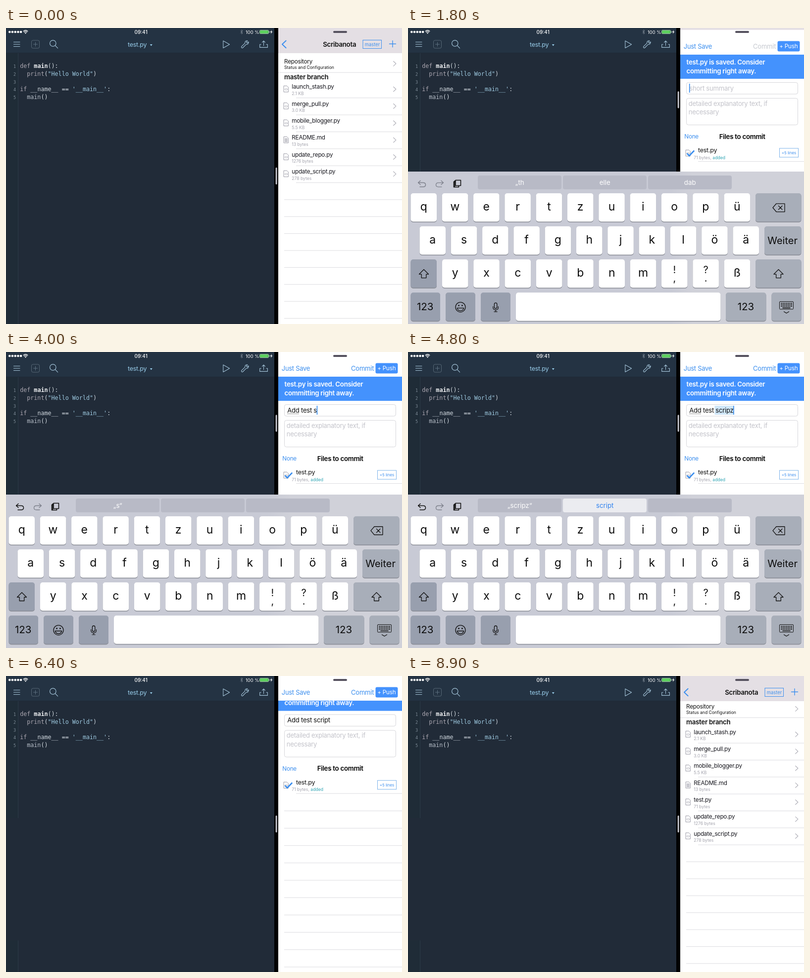
An HTML page that plays this animation: 800 px wide and 600 px high, repeating every 9000 ms.

```html
<!DOCTYPE html>
<html lang="en">
<head>
<meta charset="utf-8">
<title>Commit from the editor</title>
<style>
html, body { margin: 0; width: 100%; height: 100%; overflow: hidden; background: #212b38; }
svg { display: block; width: 800px; height: 600px; }
text { font-family: Inter, Roboto, sans-serif; white-space: pre; }
.t { letter-spacing: -.02em; }
.b { font-weight: 600; }
.m { text-anchor: middle; }
.code { font: 11.7px "DejaVu Sans Mono", monospace; }
.num { font: 8.5px "DejaVu Sans Mono", monospace; text-anchor: end; }
.i { fill: none; stroke-linecap: round; stroke-linejoin: round; }
</style>
</head>
<body>
<svg id="stage" viewBox="0 0 800 600"></svg>
<script>
const LOOP = 9000, KB = 289, BLUE = '#3d8fee', SOLID = '#4492fd';
const $ = id => document.getElementById(id);

const text = (x, y, s, size, fill, cls = 't', more = '') =>
  `<text x="${x}" y="${y}" font-size="${size}" fill="${fill}" class="${cls}" ${more}>${s}</text>`;
const rect = (x, y, w, h, fill, r = 0, more = '') =>
  `<rect x="${x}" y="${y}" width="${w}" height="${h}" rx="${r}" fill="${fill}" ${more}/>`;
const frame = (x, y, w, h, stroke, r = 0) =>
  rect(x, y, w, h, 'none', r, `stroke="${stroke}"`);
const path = (d, stroke, w = 1, more = '') =>
  `<path class="i" d="${d}" stroke="${stroke}" stroke-width="${w}" ${more}/>`;
const dot = (x, y, r, fill) => `<circle cx="${x}" cy="${y}" r="${r}" fill="${fill}"/>`;
const rule = (x, y) => `<path d="M${x} ${y}H800" stroke="#dcdce0"/>`;
const group = (id, body, more = '') => `<g id="${id}" ${more}>${body}</g>`;
const range = (n, f) => Array.from({ length: n }, (_, i) => f(i)).join('');
const span = (s, fill, more = '') => `<tspan fill="${fill}" ${more}>${s}</tspan>`;

// ---- editor ----
function editor() {
  const ink = '#a3c3d8', key = '#aaa6b0', str = '#9fcbe2', fg = '#d3dae1';
  const lines = [
    span('def ', key) + span('main', '#f0f2f4', 'font-weight="bold"') + span('():', fg),
    span('  print', key) + span('(', fg) + span('"Hello World"', str) + span(')', fg),
    '',
    span('if ', key) + span('__name__ == ', fg) + span("'__main__'", str) + span(':', fg),
    span('  main', '#b9c0ca') + span('()', fg)
  ];
  return rect(0, 0, 542, 600, '#212b38') + rect(0, 50, 24, 550, '#1f2c37') +
    path('M24.5 51V600', '#2b3a47') +
    group('patch', rect(0, 288, 26, 248, '#212b38')) +
    rect(0, 0, 542, 50, '#243343') + rect(0, 50, 542, 1, '#1f2a36') +
    range(5, i => dot(7.3 + i * 5.7, 8, 2.3, '#fff')) +
    path('M35.2 6.6Q39.5 2.8 43.8 6.6M36.8 8.5Q39.5 6.2 42.2 8.5', '#fff', 1.3) + dot(39.5, 10.4, 1.2, '#fff') +
    text(272.7, 11.6, '09:41', 10, '#fff', 'm', 'font-weight="500"') +
    path('M473.8 5.8L478.2 10.2L476 12.2V3.8L478.2 5.8L473.8 10.2', '#8894a0', .8) +
    text(484, 11.5, '100 %', 9.4, '#fff', '') +
    frame(512.5, 4.5, 18, 7, '#a9d8ae', 1.2) + rect(513.3, 5.2, 16.4, 5.6, '#5fd65f', .6) +
    rect(531.5, 6.5, 1.2, 3, '#a9d8ae') + '<path d="M537 4L533.6 8.6H535.8L535 12L538.4 7.3H536.2Z" fill="#fff"/>' +
    path('M15.5 28.5H28M15.5 33H28M15.5 37.5H28', ink, 1.1) +
    frame(51.5, 25, 16, 16, '#566775', 3) + path('M59.5 29V37M55.5 33H63.5', '#5f7281') +
    path('M101 31A6.2 6.2 0 1 1 88.6 31A6.2 6.2 0 1 1 101 31M99.2 35.4L104.6 40.8', ink, 1.2) +
    text(246, 37.8, 'test.py', 12.5, '#98cdea') + '<path d="M290.8 33H295.8L293.3 36.6Z" fill="#98cdea"/>' +
    path('M438.8 26L451.6 33.2L438.8 40.4Z', ink, 1.1) +
    path('M476 37.4L482.8 30.7C482.2 27.5 485 25 488 26L485.4 28.6L487.4 30.6L490 28C490.9 31 488.4 33.8 485.2 33.2L478.5 40C476.8 41.5 474.4 39 476 37.4Z', ink, 1.1) +
    path('M515.2 33.2H512.7V39.4H528.4V33.2H525.9M520.5 35.8V26.2M517.6 29.2L520.5 26.2L523.4 29.2', ink, 1.1) +
    lines.map((l, i) => {
      const y = 81.2 + i * 15.7;
      return text(20, y, i + 1, 8.5, '#7c8a95', 'num') + `<text x="28.2" y="${y}" class="code">${l}</text>`;
    }).join('');
}

// ---- repository list ----
const fileIcon = (y, doc) =>
  path(`M561.5 ${y}H567.5L570.3 ${y + 2.8}V${y + 12.5}H561.5Z`, '#8f8f9c', .9) +
  path(doc ? `M563.3 ${y + 4}H568.3M563.3 ${y + 6}H568.3M563.3 ${y + 8}H568.3M563.3 ${y + 10}H568.3`
    : `M565 ${y + 5.3}L563.4 ${y + 7}L565 ${y + 8.7}M566.8 ${y + 5.3}L568.4 ${y + 7}L566.8 ${y + 8.7}`, '#858593', .9);
const chevron = y => path(`M782.8 ${y - 4.8}L787.8 ${y}L782.8 ${y + 4.8}`, '#b4b4bc', 1.3);

function list(files) {
  const step = 34.37;
  return text(562, 71.8, 'Repository', 11.72, '#111') +
    text(562, 82.6, 'Status and Configuration', 8.6, '#111', '') + chevron(72.3) + rule(550, 90.2) +
    text(562, 103.7, 'master branch', 13.28, '#111', 't b') +
    files.map(([name, size], i) => {
      const y = i * step;
      return fileIcon(117.3 + y, name.endsWith('md')) + text(577.3, 123.3 + y, name, 11.72, '#15151c') +
        text(577.3, 135.9 + y, size, 8.6, '#a3a3ad', '') + chevron(124 + y);
    }).join('') +
    range(14, i => rule(i < files.length ? 586 : 562, 141.7 + i * step));
}

const files = [['launch_stash.py', '2.1 KB'], ['merge_pull.py', '3.0 KB'], ['mobile_blogger.py', '5.5 KB'],
  ['README.md', '13 bytes'], ['update_repo.py', '1276 bytes'], ['update_script.py', '278 bytes']];
const added = [...files.slice(0, 4), ['test.py', '71 bytes'], ...files.slice(4)];

function browser() {
  return rect(550, 0, 250, 600, '#fff') + group('before', list(files)) +
    group('after', list(added), 'transform="translate(0 -5.7)"') +
    rect(550, 0, 250, 51, '#e4dfe4') +
    path('M565.6 25.8L558 33L565.6 40.2', BLUE, 2) +
    text(673.7, 37.8, 'Scribanota', 13.28, '#111', 't b m') +
    frame(721, 24.5, 37.5, 17, BLUE) + text(740, 36.6, 'master', 9.37, BLUE, 'm') +
    path('M774.5 32.2H787.5M781 25.7V38.7', BLUE, 1.4);
}

// ---- commit sheet ----
function sheet() {
  const hint = '#c3c3ca';
  const body = frame(562.5, 106.5, 225, 23.5, '#d6d6da', 4) + frame(562.5, 138.5, 225, 54, '#d6d6da', 4) +
    group('mark', rect(0, 109, 38, 18, '#cfe6f8')) +
    text(568.3, 122.6, 'short summary', 13.1, hint, 't', 'id="short"') +
    text(568.3, 122.6, '', 13.1, '#111', 't', 'id="summary"') +
    group('spell', path('M568.5 125.3H592', '#555', 1.3, 'style="stroke-linecap:butt" stroke-dasharray="1.2 1.2"')) +
    group('caret', rect(0, 109, 1.7, 18, BLUE)) +
    text(566.8, 153.8, 'detailed explanatory text, if', 13, hint) + text(566.8, 171.2, 'necessary', 13, hint) +
    text(558.3, 220.4, 'None', 11.72, BLUE) + text(675.2, 220.8, 'Files to commit', 13.28, '#000', 't b m') +
    fileIcon(243.3) + path('M563.5 250.2L568.2 255L578.2 244.6', BLUE, 2.8, 'style="stroke-linecap:butt;stroke-linejoin:miter"') +
    text(586, 248.4, 'test.py', 12.5, '#111') +
    text(577.3, 261.6, '71 bytes' + `<tspan id="state">, ${span('added', '#2fa5b4')}</tspan>`, 8.6, '#a3a3ad', '') +
    frame(750.5, 240, 38, 18, '#7db3ea') + text(769.5, 251.9, '+5 lines', 7.9, BLUE, 'm') +
    rule(586, 266.5) + range(11, i => rule(562, 301.7 + i * 35.17));
  const banner = rect(550, 50, 250, 49, SOLID) +
    text(562.6, 70.4, 'test.py is saved. Consider', 13.28, '#fff', 't b') +
    text(562.6, 87.8, 'committing right away.', 13.28, '#fff', 't b');
  return rect(550, 0, 250, 600, '#fff') + group('form', banner + body) +
    rect(550, 0, 250, 50, '#fff') + group('edge', rect(550, 50, 250, 1, '#8e8e92')) +
    text(556.8, 37.8, 'Just Save', 12.9, BLUE) + text(697, 37.8, 'Commit', 13.1, BLUE, 't', 'id="commit"') +
    rect(746.5, 22.5, 45, 21, SOLID, 3) + text(768.8, 37.2, '+ Push', 11.72, '#fff', 't m', 'id="push"');
}

// ---- keyboard ----
function keyboard() {
  const cap = (x, y, w, fill) => rect(x, y + 1, w, 58, '#898c95', 5) + rect(x, y, w, 57.5, fill, 5);
  const dark = '#989fae', soft = '#a8aeb9', rows = [333, 400, 467, 534.3];
  const label = (x, y, s, size = 23) => text(x, y, s, size, '#0c0c0c', 'm');
  const letters = (s, x, y) => [...s].map((c, i) => {
    const kx = x + i * 63.3, mid = kx + 26.2;
    return cap(kx, y, 52.5, '#fff') + (c === '!' || c === '?'
      ? label(mid, y + 27.5, c, 20) + label(mid, y + 44.5, c === '!' ? ',' : '.', 20)
      : label(mid, y + 35, c));
  }).join('');
  const shift = x => path(`M${x} 487.5L${x + 9.5} 497H${x + 4.8}V504.5H${x - 4.8}V497H${x - 9.5}Z`, '#111', 1.3);
  const undo = 'M25 307.5L20.5 311.5L25 315.5M20.8 311.5H30.5Q35.5 311.5 35.5 316Q35.5 320 30.5 320H24';
  return `<linearGradient id="tint"><stop offset=".66" stop-color="#c8cad5"/><stop offset=".72" stop-color="#d0d1d9"/></linearGradient>` +
    rect(0, KB, 800, 330, 'url(#tint)') +
    path(undo, '#111', 1.5, 'id="undo"') + path(undo, '#7d808b', 1.3, 'transform="translate(92 0) scale(-1 1)"') +
    group('paste', path('M95.5 309.5H92.5V320.5H102.5V318', 'currentColor', 1.6) +
      path('M96 306.5H106.5V317.5H96Z', 'currentColor', 1.6) + path('M94.3 308V319', 'currentColor', 2)) +
    range(3, i => rect(141 + i * 172, 297, 169, 28, '#b8bac6', 4, `id="slot${i}"`) +
      text(225.7 + i * 172, 315.6, '', 13.28, '#fff', 'm', `id="word${i}"`)) +
    letters('qwertzuiopü', 5.5, rows[0]) + cap(702, rows[0], 92.5, soft) +
    path('M737 362.2L744 354H761V370.5H744ZM748.5 358.5L756 366M756 358.5L748.5 366', '#111', 1.3) +
    letters('asdfghjklöä', 23.5, rows[1]) + cap(720, rows[1], 74.5, soft) + label(756.6, 436, 'Weiter', 20) +
    cap(5.5, rows[2], 52.5, dark) + shift(32) + letters('yxcvbnm!?ß', 69, rows[2]) +
    cap(702, rows[2], 92.5, soft) + shift(748.5) +
    cap(5.5, rows[3], 59.5, dark) + label(34.8, 570.4, '123', 20.5) +
    cap(76, rows[3], 60, dark) + path('M116 563.8A10 10 0 1 1 96 563.8A10 10 0 1 1 116 563.8M99.3 565.5H112.7Q111.5 571 106 571Q100.5 571 99.3 565.5Z', '#111', 1.3) +
    dot(102.6, 560.5, 1.4, '#111') + dot(109.4, 560.5, 1.4, '#111') +
    cap(147, rows[3], 60, dark) + rect(174.4, 555, 5.4, 11.5, 'none', 2.7, 'stroke="#111" stroke-width="1.3"') +
    path('M171.8 562.5V564.5Q171.8 569.3 177.1 569.3Q182.4 569.3 182.4 564.5V562.5M177.1 569.3V573M174 573H180.2', '#111', 1.2) +
    cap(218, rows[3], 413.5, '#fff') +
    cap(642, rows[3], 81.5, soft) + label(682.5, 570.4, '123', 20.5) +
    cap(734.5, rows[3], 60, soft) + frame(750.5, 552.5, 28, 15.5, '#111', 1.5) +
    range(3, i => path(`M753.5 ${556 + i * 3}H776`, '#111', 2, 'style="stroke-linecap:butt" stroke-dasharray="2 1.4"')) +
    path('M757 565.3H772', '#111', 1.6) + path('M759.5 573L764.5 576L769.5 573', '#111', 1.3);
}

$('stage').innerHTML = editor() + rect(542, 0, 8, 600, '#000') +
  group('grip', rect(544.6, -17.2, 3.2, 34.4, '#b9b9c0', 1.6)) +
  '<clipPath id="side"><rect x="550" y="0" width="250" height="600"/></clipPath>' +
  group('pane', browser() + group('sheet', sheet()), 'clip-path="url(#side)"') +
  rect(661, 6, 28, 4, '#55515e', 2) + group('keys', keyboard());

// ---- motion ----
const typed = 'Add test scripz';
const strokes = [2200, 2400, 2600, 2700, 2900, 3200, 3400, 3600, 3800, 4000, 4150, 4300, 4450, 4600, 4750];
const FIXED = 5000, HIDE = 5400;

const part = (t, a, d) => Math.min(1, Math.max(0, (t - a) / d));
const out = (t, a, d) => 1 - (1 - part(t, a, d)) ** 3;
const show = (id, on) => $(id).setAttribute('display', on ? 'inline' : 'none');
const move = (id, x, y) => $(id).setAttribute('transform', `translate(${x} ${y})`);
const set = (id, name, v) => $(id).setAttribute(name, v);

function hints(n, t) {
  if (n === 0) return ['„th', 'elle', 'dab'];
  if (n <= 5) return ['st', 'und', 'ich'];
  if (t >= FIXED) return ['„script“', '', ''];
  const word = typed.slice(0, n).split(' ').pop();
  return [word && `„${word}“`, n === typed.length ? 'script' : '', ''];
}

function draw(t) {
  const n = strokes.filter(s => s <= t).length;
  const rise = out(t, 1300, 615), fall = out(t, HIDE, 490);
  const top = 600 - 311 * (rise - fall);
  move('keys', 0, top - KB);
  move('grip', 0, top / 2);
  show('keys', top < 600);
  show('patch', t >= FIXED);

  show('before', t < 7900);
  show('after', t >= 7900);
  const leave = out(t, 8000, 500);
  move('sheet', 0, 600 * (1 - rise + leave));
  const shrink = out(t, 6300, 400);
  move('form', 0, -49 * shrink);
  show('edge', shrink > .9);
  show('state', t < 6600);
  set('push', 'fill', t >= 6900 ? '#a5caff' : '#fff');
  set('commit', 'fill', n ? BLUE : '#c6c9d0');

  const editing = t < HIDE, pending = n === typed.length && t < FIXED;
  const field = $('summary');
  field.textContent = t >= FIXED ? 'Add test script' : typed.slice(0, n);
  const end = 568.3 + (n ? field.getComputedTextLength() : 0);
  show('short', !n);
  show('caret', editing);
  move('caret', end - .4, 0);
  show('spell', n > 3 && editing);
  show('mark', pending);
  if (pending) move('mark', end - 38, 0);

  set('undo', 'stroke', n && editing ? '#111' : '#7d808b');
  set('paste', 'color', editing ? '#111' : '#6d707b');
  hints(n, t).forEach((w, i) => { $('word' + i).textContent = w; });
  set('slot1', 'fill', pending ? '#ebecf0' : '#b8bac6');
  set('word1', 'fill', pending ? '#2f82ee' : '#fff');
}

function tick() {
  draw(Math.floor(performance.now() % LOOP / 100) * 100);
  requestAnimationFrame(tick);
}
tick();
</script>
</body>
</html>
```
